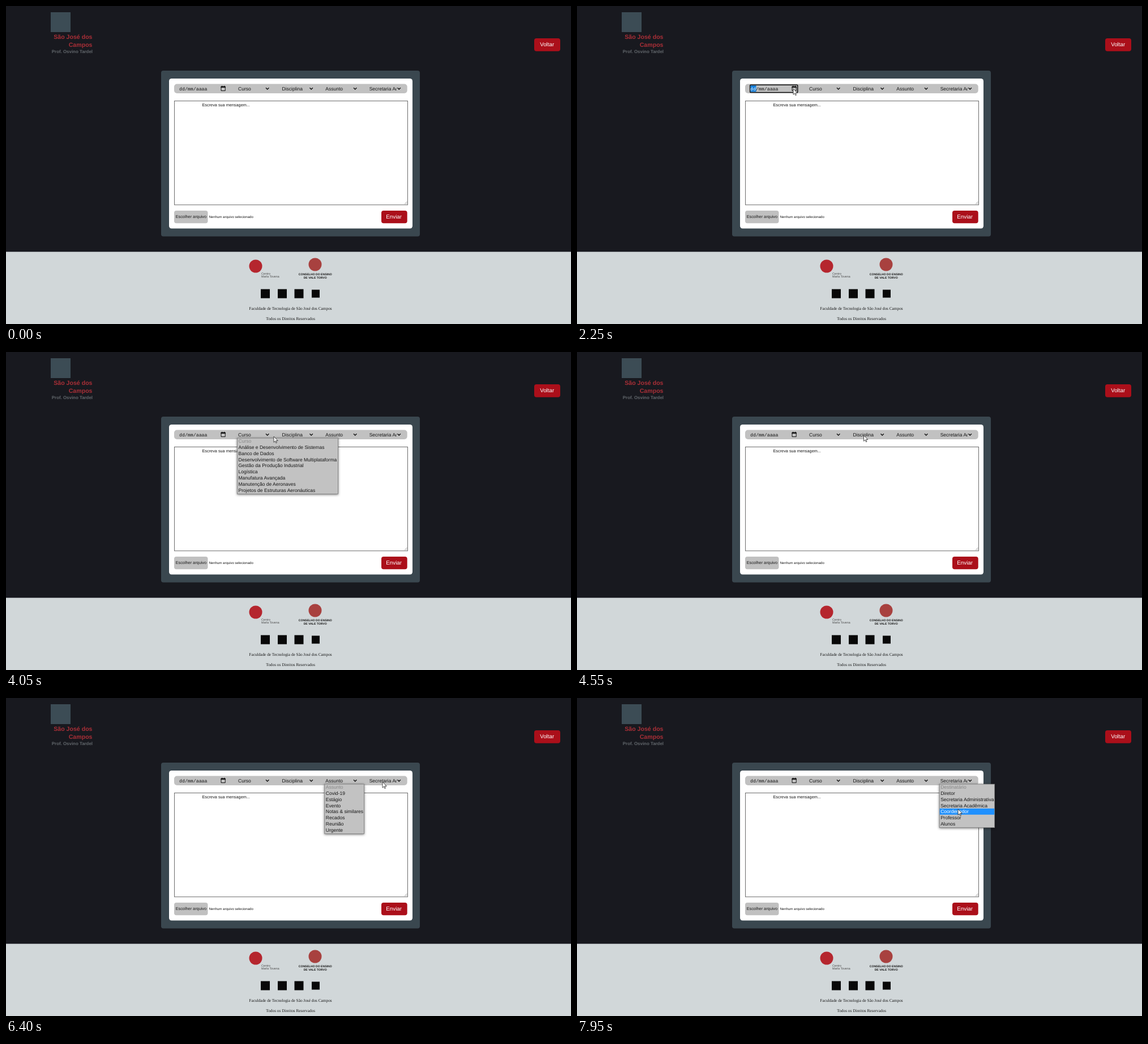
Recreate the animation shown at these times as an HTML page. Size 998 px wide and 561 px high, loop 8 s.

```html
<!DOCTYPE html>
<html lang="pt-BR">
<head>
<meta charset="utf-8">
<title>Nova mensagem</title>
<style>
html, body { margin: 0; width: 100%; height: 100%; overflow: hidden; background: #18191f; }
svg { display: block; width: 100%; height: 100%; font: 8.53px "Liberation Sans", Arial, sans-serif; fill: #161616; text-rendering: geometricPrecision; }
.mono { font-family: "Liberation Mono", monospace; font-size: 8.25px; }
.serif { font-family: "Liberation Serif", serif; font-size: 7.3px; text-anchor: middle; }
.btn { font-size: 9.8px; fill: #fff; text-anchor: middle; }
.small { font-size: 7.3px; }
.bold { font-weight: bold; }
.end { text-anchor: end; }
.mid { text-anchor: middle; }
.popup { filter: drop-shadow(0 1px 2px #0008); }
</style>
</head>
<body>
<svg viewBox="0 0 998 561" preserveAspectRatio="none">
  <defs><clipPath id="clip"><rect x="640" y="138" width="49.8" height="16"/></clipPath></defs>
  <rect width="998" height="561" fill="#18191f"/>

  <rect x="79" y="11" width="35" height="35" fill="#3c4c55"/>
  <g class="bold end">
    <g font-size="10.6" fill="#a92f37"><text x="152.5" y="57.6">São José dos</text><text x="152.5" y="71.8">Campos</text></g>
    <text x="153" y="82.6" font-size="7.9" fill="#62676c">Prof. Osvino Tardel</text>
  </g>
  <rect x="933" y="57" width="46" height="22.7" rx="4" fill="#ab0f1a"/>
  <text class="btn" x="955.7" y="71.3">Voltar</text>

  <rect x="274" y="114" width="457" height="292.5" rx="4" fill="#3a474f"/>
  <rect x="288" y="128" width="430" height="264.5" rx="4.5" fill="#fff"/>
  <rect x="297" y="137.5" width="411.7" height="16.5" rx="5" fill="#c1c1c1"/>

  <g id="focus">
    <rect x="305.7" y="139.2" width="84" height="13.3" rx="1" fill="none" stroke="#101010" stroke-width="1.6"/>
    <rect x="306.5" y="140.3" width="10" height="11" fill="#0a78d7"/>
  </g>
  <text class="mono" x="306" y="148.8"><tspan id="day">dd</tspan>/mm/aaaa</text>
  <path d="M380 142.2h7.2v7.3h-7.2z" fill="none" stroke="#111"/>
  <path d="M379.5 141.7h8.2v2.3h-8.2zM381 140.8h1.2v1h-1.2zM385 140.8h1.2v1h-1.2z" fill="#111"/>
  <g id="fields"></g>

  <rect x="297.5" y="167.5" width="412" height="183.3" fill="#fff" stroke="#6b6b6b"/>
  <path d="M704 349.5l4.500-4.500M706.500 349.500l2-2" stroke="#777" stroke-width=".7"/>
  <text class="small" x="346.500" y="176.500">Escreva sua mensagem...</text>
  <rect x="297" y="361" width="59.500" height="22.300" rx="4" fill="#c0c0c0"/>
  <text class="small" x="299.700" y="374.300">Escolher arquivo</text>
  <text x="358.500" y="374.400" font-size="6.060">Nenhum arquivo selecionado</text>
  <rect x="663" y="361" width="45.700" height="22.300" rx="4" fill="#ab0f1a"/>
  <text class="btn" x="685.200" y="374.800">Enviar</text>

  <rect y="433.600" width="998" height="127.400" fill="#d1d7d9"/>
  <circle cx="441" cy="459" r="11.500" fill="#b5262e"/>
  <g font-size="5.300" fill="#4a4a4a"><text x="451" y="473.800">Centro</text><text x="451" y="479">Marla Tovena</text></g>
  <circle cx="546" cy="456" r="11.500" fill="#a8413f"/>
  <g class="bold mid" font-size="5.100"><text x="546.200" y="474.700">CONSELHO DO ENSINO</text><text x="546.200" y="480.500">DE VALE TORVO</text></g>
  <path d="M450 499.500h16v16h-16zM480 499.500h16v16h-16zM509.500 499.500h16v16h-16zM540 500.500h14v14h-14z" fill="#080808"/>
  <g class="serif">
    <text x="502.500" y="536">Faculdade de Tecnologia de São José dos Campos</text>
    <text x="502.700" y="554.200">Todos os Direitos Reservados</text>
  </g>

  <g id="calendar" class="popup"></g>
  <g id="menus"></g>
  <path id="cursor" d="M0 0V10.300L2.400 8.100L4 11.700L5.500 11L3.900 7.500H7.300Z" fill="#fff" stroke="#222" stroke-width=".8"/>
</svg>
<script>
const $ = id => document.getElementById(id);
const text = (x, y, s, attrs = '') => `<text x="${x}" y="${y}" ${attrs}>${s}</text>`;
const rect = (x, y, w, h, attrs) => `<rect x="${x}" y="${y}" width="${w}" height="${h}" ${attrs}/>`;
const show = (el, on) => el.setAttribute('visibility', on ? 'visible' : 'hidden');

const TOP = 151.6, ROW = 10.84;
const menus = [
  { x: 408, w: 179, from: 3550, to: 4500, items: ['Curso', 'Análise e Desenvolvimento de Sistemas', 'Banco de Dados',
    'Desenvolvimento de Software Multiplataforma', 'Gestão da Produção Industrial', 'Logística', 'Manufatura Avançada',
    'Manutenção de Aeronaves', 'Projetos de Estruturas Aeronáuticas'] },
  { x: 485.5, w: 196.5, from: 4600, to: 5550, items: ['Disciplina', 'Algoritmo e Lógica de Programação', 'Engenharia de Software',
    'Desenvolvimento Web', 'Design Digital', 'Modelagem de Banco de Dados', 'Sistemas Operacionais e Redes de Computadores'] },
  { x: 562.3, w: 70.7, from: 5650, to: 6500, items: ['Assunto', 'Covid-19', 'Estágio', 'Evento', 'Notas &amp; similares',
    'Recados', 'Reunião', 'Urgente'] },
  { x: 639.7, w: 98.5, from: 6600, to: 8000, items: ['Destinatário', 'Diretor', 'Secretaria Administrativa',
    'Secretaria Acadêmica', 'Coordenador', 'Professor', 'Alunos'] }
];
const SELECTED = 2;

menus.forEach((m, i) => {
  const label = i < 3 ? m.items[0] : m.items[SELECTED];
  $('fields').innerHTML += text(m.x + 2, 148.6, label, i < 3 ? '' : 'clip-path="url(#clip)"') +
    `<path d="M${459 + 77.5 * i} 144.300l2.700 2.700l2.700-2.700" fill="none" stroke="#111" stroke-width="1.400"/>`;
  $('menus').innerHTML += '<g class="popup">' +
    rect(m.x + .5, TOP + .4, m.w - 1, m.items.length * ROW + .8, 'fill="#c2c2c2" stroke="#7b7b7b" stroke-width=".8"') +
    (i === 3 ? rect(m.x + 1, 0, m.w - 2, ROW, 'id="bar" fill="#1e90ff"') : '') +
    m.items.map((s, k) => text(m.x + 2.5, (TOP + 8.5 + k * ROW).toFixed(2), s, k ? '' : 'fill="#878787"')).join('') + '</g>';
});
const menuEls = [...$('menus').children];
const options = [...menuEls[3].querySelectorAll('text')];

function calendarMarkup() {
  let s = rect(304, 154, 105, 127, 'fill="#fff" stroke="#bbb" stroke-width=".6"') +
    text(309, 166, 'outubro de 2021', 'font-size="6.8"') +
    text(391, 166, '↑', 'font-size="7"') + text(401, 166, '↓', 'font-size="7"');
  const cell = (col, y, label, color) => text(313 + col * 14.5, y, label, `class="mid" font-size="6.5" fill="${color}"`);
  [...'DSTQQSS'].forEach((d, i) => s += cell(i, 179, d, '#222'));
  for (let i = 0; i < 42; i++) {
    const d = new Date(2021, 8, 26 + i);
    s += cell(i % 7, 191 + 14 * Math.floor(i / 7), d.getDate(), d.getMonth() === 9 ? '#222' : '#999');
  }
  return s + text(309, 276, 'Limpar', 'font-size="6.5" fill="#1a73e8"') +
    text(404, 276, 'Hoje', 'class="end" font-size="6.5" fill="#1a73e8"');
}
$('calendar').innerHTML = calendarMarkup();

// time, x, y of the pointer tip
const path = [
  [850, 771, 342], [950, 700, 300], [1250, 700, 300], [1700, 383, 147], [1800, 383, 147], [1850, 382, 146],
  [2700, 382, 146], [3550, 436, 147], [4050, 473, 149], [4400, 500, 147], [4500, 505, 147], [4600, 508, 147],
  [5100, 588, 147], [5350, 588, 147], [5450, 592, 147], [5650, 596, 147], [6150, 664, 148], [6350, 664, 148],
  [6400, 665, 148], [6600, 666, 148], [7050, 668, 158], [7200, 668, 162], [7650, 674, 210], [7750, 674, 210],
  [7950, 673, 196]
];
function pointer(t) {
  const i = path.findIndex(p => p[0] > t);
  if (i < 0) return path[path.length - 1].slice(1);
  const [t0, x0, y0] = path[Math.max(0, i - 1)], [t1, x1, y1] = path[i];
  const u = t1 > t0 ? (t - t0) / (t1 - t0) : 0, k = u * u * (3 - 2 * u);
  return [x0 + (x1 - x0) * k, y0 + (y1 - y0) * k];
}

function draw(t) {
  const [x, y] = pointer(t);
  $('cursor').setAttribute('transform', `translate(${x} ${y})`);
  show($('cursor'), t >= 850);
  const focused = t >= 2250 && t < 3600;
  show($('focus'), focused);
  $('day').setAttribute('fill', focused ? '#fff' : '#161616');
  show($('calendar'), t >= 2300 && t < 3550);
  menus.forEach((m, i) => show(menuEls[i], t >= m.from && t < m.to));

  const hover = Math.floor((y - TOP) / ROW), active = hover >= 1 ? hover : SELECTED;
  $('bar').setAttribute('y', TOP + active * ROW);
  options.forEach((o, i) => o.setAttribute('fill', i === active ? '#fff' : i ? '#161616' : '#878787'));
}

const start = performance.now();
function frame() {
  const t = (performance.now() - start) % 8000;
  draw(Math.floor(t / 50) * 50);
  requestAnimationFrame(frame);
}
frame();
</script>
</body>
</html>
```
